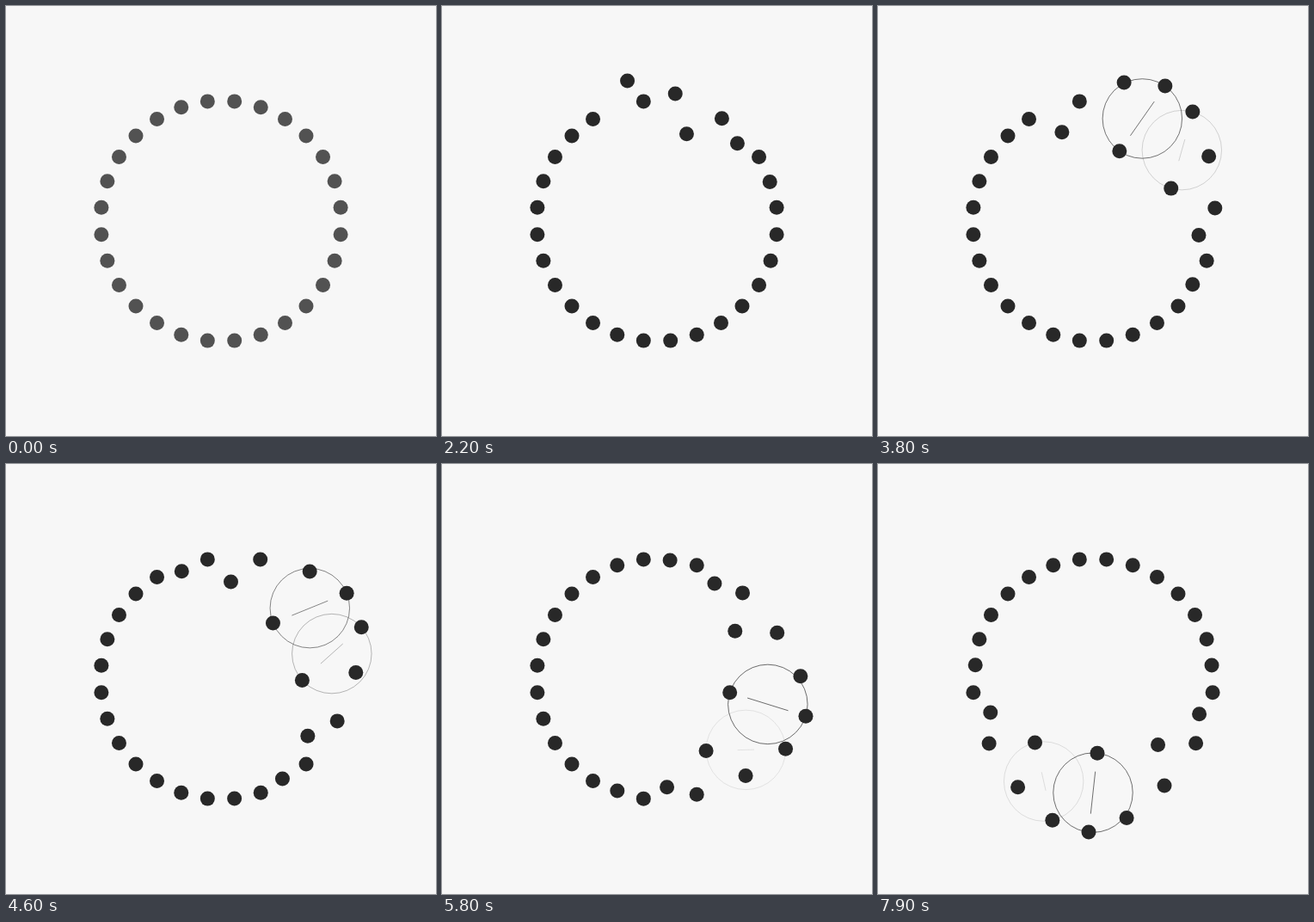
An HTML page with a canvas that plays this animation: 500x500 px, repeating every 8000 ms.

```html
<!DOCTYPE html>
<html lang="en">
<head>
<meta charset="utf-8">
<title>Swapping ring</title>
<style>
  html, body { margin: 0; width: 100%; height: 100%; overflow: hidden; background: #f7f7f7; }
  canvas { display: block; width: 500px; height: 500px; }
</style>
</head>
<body>
<canvas id="stage" width="500" height="500"></canvas>
<script>
const ctx = document.getElementById('stage').getContext('2d');
const TAU = Math.PI * 2;
const LOOP = 8000, STEP = 100;
const PAIRS = 14, SPACING = TAU / 28;
const RING = 140, DOT = 8.5;
// Each dot trades places with the third one along, round the middle of their chord.
const ORBIT = RING * Math.sin(1.5 * SPACING);
const HUB = RING * Math.cos(1.5 * SPACING);
const FIRST_MID = 2970, STAGGER = 691, TURN = 5880;
const GUIDE_SPAN = 800, GUIDE_HALF = 25;

const clamp = x => Math.min(1, Math.max(0, x));
const ease = u => u ** 4 * (35 - 84 * u + 70 * u * u - 20 * u ** 3);

function pairAt(m, t) {
  const a = m * 2 * SPACING;
  const dt = t - FIRST_MID - m * STAGGER;
  const turn = a + Math.PI * ease(clamp(0.5 + dt / TURN));
  return {
    x: 250 + HUB * Math.sin(a),
    y: 250 - HUB * Math.cos(a),
    dx: Math.cos(turn),
    dy: Math.sin(turn),
    glow: clamp(1 - (dt / GUIDE_SPAN) ** 2)
  };
}

function drawGuide({ x, y, dx, dy, glow }) {
  if (!glow) return;
  const h = GUIDE_HALF * glow;
  ctx.globalAlpha = 0.85 * glow * glow;
  ctx.beginPath();
  ctx.arc(x, y, ORBIT, 0, TAU);
  ctx.moveTo(x - h * dx, y - h * dy);
  ctx.lineTo(x + h * dx, y + h * dy);
  ctx.stroke();
}

function drawDots({ x, y, dx, dy }) {
  for (const side of [-ORBIT, ORBIT]) {
    ctx.beginPath();
    ctx.arc(x + side * dx, y + side * dy, DOT, 0, TAU);
    ctx.fill();
  }
}

function draw(t) {
  ctx.globalAlpha = 1;
  ctx.fillStyle = '#f7f7f7';
  ctx.fillRect(0, 0, 500, 500);
  ctx.fillStyle = ctx.strokeStyle = '#282828';
  ctx.lineWidth = 0.8;
  const pairs = Array.from({ length: PAIRS }, (_, m) => pairAt(m, t));
  pairs.forEach(drawGuide);
  ctx.globalAlpha = 0.8 + 0.2 * clamp(t / 900);
  pairs.forEach(drawDots);
}

const start = performance.now();
function tick() {
  const t = (performance.now() - start) % LOOP;
  draw(Math.floor(t / STEP) * STEP);
  requestAnimationFrame(tick);
}
tick();
</script>
</body>
</html>
```
